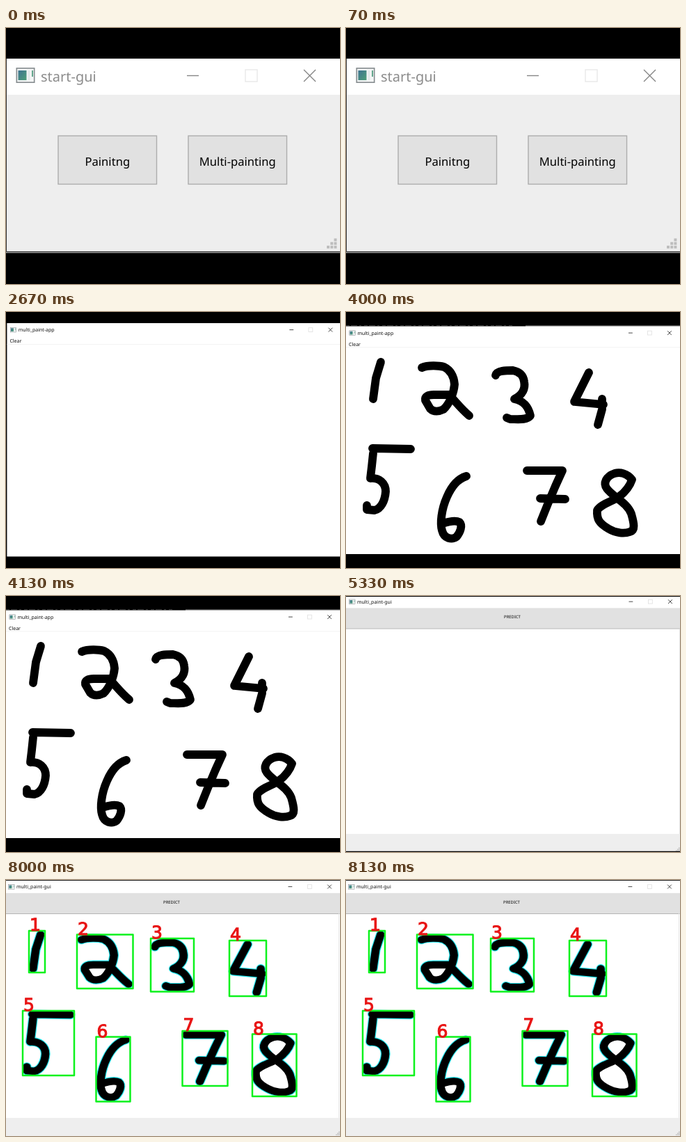
Animation of 480x368 px, one loop 9340 ms. Source, as an HTML page:

```html
<!DOCTYPE html>
<html lang="en">
<head>
<meta charset="utf-8">
<title>Painting windows</title>
<style>
html, body { margin: 0; width: 100%; height: 100%; overflow: hidden; background: #000; }
svg { display: block; width: 100vw; height: 100vh; }
text { font-family: "Noto Sans", sans-serif; text-rendering: geometricPrecision; white-space: pre; }
.label { font-family: "DejaVu Sans", sans-serif; }
</style>
</head>
<body>
<svg id="stage" viewBox="0 0 480 368"></svg>
<script>
const LOOP = 9340;
const CUTS = [0, 1330, 2670, 4000, 5330, 6670, 8000];

const rect = (x, y, w, h, fill, more = '') =>
  `<rect x="${x}" y="${y}" width="${w}" height="${h}" fill="${fill}" ${more}/>`;
const text = (x, y, size, str, fill = '#111', more = '') =>
  `<text x="${x}" y="${y}" font-size="${size}" fill="${fill}" ${more}>${str}</text>`;
const line = (d, color, width, more = '') =>
  `<path d="${d}" fill="none" stroke="${color}" stroke-width="${width}" ${more}/>`;
const centred = 'text-anchor="middle"';

// Generic window icon, 27 x 22 units before scaling
function icon(x, y, k) {
  return `<g transform="translate(${x} ${y}) scale(${k})">` +
    rect(0.8, 0.8, 25.4, 20.4, '#f4f6f6', 'stroke="#858b8e" stroke-width="1.6"') +
    rect(3, 4, 12, 14, 'url(#teal)') +
    rect(17, 4, 3, 14, '#e3e7e8') + rect(22.5, 4, 2, 9, '#62a58c') + '</g>';
}

// Minimise, maximise and close; xs holds their left edges
function controls(xs, y, size, width, dark, pale) {
  const [a, b, c] = xs, h = size / 2;
  return line(`M${a} ${y}h${size}`, dark, width) +
    rect(b, y - h, size, size, 'none', `stroke="${pale}" stroke-width="${width}"`) +
    line(`M${c} ${y - h}l${size} ${size}m0 ${-size}l${-size} ${size}`, dark, width);
}

function grip(x, y, size, gap, color = '#bdbdbd') {
  let out = '';
  for (let row = 0; row < 3; row++)
    for (let col = 2 - row; col < 3; col++)
      out += rect(x + col * gap, y + row * gap, size, size, color);
  return out;
}

function button(x, y, label, hover) {
  return rect(x, y, 141.5, 69.5, hover ? '#cce4f7' : '#e1e1e1',
      `stroke="${hover ? '#0b5c9f' : '#adadad'}" stroke-width="1.4"`) +
    text(x + 70.8, y + 42.5, 16.6, label, '#000', centred);
}

function startWindow(y, active) {
  const dark = active ? '#000' : '#858585';
  return rect(1, y, 479, 278, '#eee') + rect(1, y, 479, 52, '#fff') +
    icon(14.5, y + 13, 1) +
    text(50, y + 33, 20, 'start-gui', active ? '#000' : '#8c8c8c') +
    controls([260, 344, 428], y + 24.5, 17, 1.4, dark, active ? '#ccc' : '#e8e8e8') +
    button(75, y + 111, 'Painitng', false) +
    button(262, y + 111, 'Multi-painting', active);
}

function appWindow(x, y, bottom) {
  return rect(x, y, 480 - x, bottom - y, '#fff') +
    icon(x + 4.6, y + 6, 0.33) +
    text(x + 16.4, y + 12.4, 7, 'multi_paint-app') +
    text(x + 4, y + 28, 7, 'Clear') +
    controls([x + 406, x + 433.5, x + 462], y + 9.6, 5.8, 0.9, '#333', '#e2e2e2') +
    rect(x, y + 30, 480 - x, 0.8, '#f0f0f0');
}

function guiWindow(x, y, hover) {
  const w = 480 - x;
  return rect(0, 0, 480, 368, '#fff') +
    icon(x + 4.4, y + 4.4, 0.33) +
    text(x + 16, y + 10.6, 7, 'multi_paint-gui') +
    controls([x + 406.5, x + 434.5, x + 463], y + 7.8, 5.8, 0.9, '#333', '#e2e2e2') +
    rect(x, y + 17, w, 29.5, hover ? '#cce4f7' : '#e1e1e1') +
    rect(x, y + 46.2, w, 1, hover ? '#5d92bd' : '#b5b5b5') +
    text(x + 239, y + 32, 5.9, 'PREDICT', '#000', centred) +
    rect(x, 342, w, 26, '#eee') + grip(474, 361.5, 1.5, 2);
}

// Brush strokes of the eight digits
const DIGITS = [
  'M50 72L43 95L39 125',
  'M109 80C118 76 134 77 141 79C151 84 155 92 156 104C155 116 149 132 140 140C134 143 126 144 121 139L114 127C113 121 118 119 126 119H148C157 128 165 139 177 149',
  'M215 91C217 84 230 84 240 84C250 86 255 92 256 100C258 110 254 119 242 125C256 128 262 136 265 149C260 156 246 154 236 154L231 152',
  'M349 87L328 129L370 133M368 125L368 140L362 162',
  'M93 197L38 196M39 203L37 222L35 239C48 238 57 246 57 258C56 272 50 283 41 285L30 284V278',
  'M173 236C160 240 151 252 145 266C137 284 135 304 138 314C141 326 152 328 159 323C164 317 168 307 163 302C157 299 148 301 139 304',
  'M260 228L311 228L301 250L290 276L280 301M279 268L315 269',
  'M411 241C404 232 394 230 386 232C374 236 369 246 375 254C384 266 404 274 410 290C414 304 416 314 408 316C400 319 388 318 378 312C364 304 360 298 361 285C366 276 384 272 393 265C402 258 408 250 411 241'
].join('');
const HOLES = 'M115 120H150L136 142H124ZM140 304H162L156 322H141ZM374 240L390 232L409 242L390 264ZM362 284L390 268L410 292V315H385L364 300Z';
const ROUND = 'stroke-linecap="round" stroke-linejoin="round"';

// Left, top, right and bottom of each detection
const BOXES = [
  [33, 73, 56, 133], [102, 78.5, 182.5, 156], [208, 84, 270, 160.5], [321, 87, 374, 167],
  [24, 188, 98, 281], [129.5, 225.5, 178.5, 318.5], [253.5, 217, 318.5, 296], [354, 221.5, 417.5, 311]
];

function detections() {
  const ink = '<g transform="matrix(.995 0 0 .922 0 12.2)">' +
    line(DIGITS, '#1ee8f0', 13.8, ROUND) +
    `<path d="${HOLES}" fill="#fff"/>` +
    line(DIGITS, '#000', 11.4, ROUND) + '</g>';
  return ink + BOXES.map(([l, t, r, b], i) =>
    rect(l, t, r - l, b - t, 'none', 'stroke="#0cf21c" stroke-width="2.5" stroke-linejoin="round"') +
    text(l + 1, t + 0.2, 25, i + 1, '#e81414', 'class="label" stroke="#e81414" stroke-width="1.1"')
  ).join('');
}

const black = rect(0, 0, 480, 368, '#000');
const SCENES = [
  black + rect(0, 44, 1, 279, '#2c2c2c') + startWindow(44, false) +
    grip(461, 302.5, 4, 5.2) + rect(0, 321, 480, 1.3, '#333') + rect(0, 322.3, 480, 1, '#ddd'),
  black + startWindow(46, true) + rect(0, 46, 1.5, 276, '#1c1c1c') +
    rect(0, 140, 1.5, 52, '#8a8a8a') + rect(0, 322, 480, 2, '#000') + grip(461, 304.5, 4, 5.2),
  black + appWindow(1.4, 16, 351.5),
  black + line('M0 19.5H240', '#3a3a3a', 1, 'stroke-dasharray="5 2 9 3 3 4"') +
    rect(258, 19.6, 222, 1, '#bbb') + appWindow(0, 20.5, 348) + line(DIGITS, '#000', 11.8, ROUND),
  guiWindow(0, 0.3, false) + rect(0, 0, 480, 1, '#000') + rect(0, 366.8, 480, 1.2, '#000') +
    rect(479.2, 47, 0.8, 295, '#ddd'),
  guiWindow(1.4, 0.8, true) + rect(0, 0, 480, 0.9, '#555') + rect(0, 0, 1.2, 368, '#8c8c8c') +
    rect(0, 173, 1.3, 30, '#000') + rect(0, 336, 1.3, 32, '#000'),
  guiWindow(-1, 1.8, false) + rect(0, 0, 480, 1, '#222') + rect(478, 47, 1, 295, '#e4e4e4') + detections()
];

const stage = document.getElementById('stage');
stage.innerHTML = '<defs><linearGradient id="teal" x2="1" y2="1">' +
  '<stop stop-color="#3f7390"/><stop offset="1" stop-color="#4f9f78"/></linearGradient></defs>' +
  SCENES.map(s => `<g class="scene" display="none">${s}</g>`).join('');
const groups = [...stage.querySelectorAll('.scene')];

function draw(t) {
  const now = CUTS.filter(c => c <= t).length - 1;
  groups.forEach((g, i) => g.setAttribute('display', i === now ? 'inline' : 'none'));
}

const start = performance.now();
function tick() {
  draw((performance.now() - start) % LOOP);
  requestAnimationFrame(tick);
}
tick();
</script>
</body>
</html>
```
